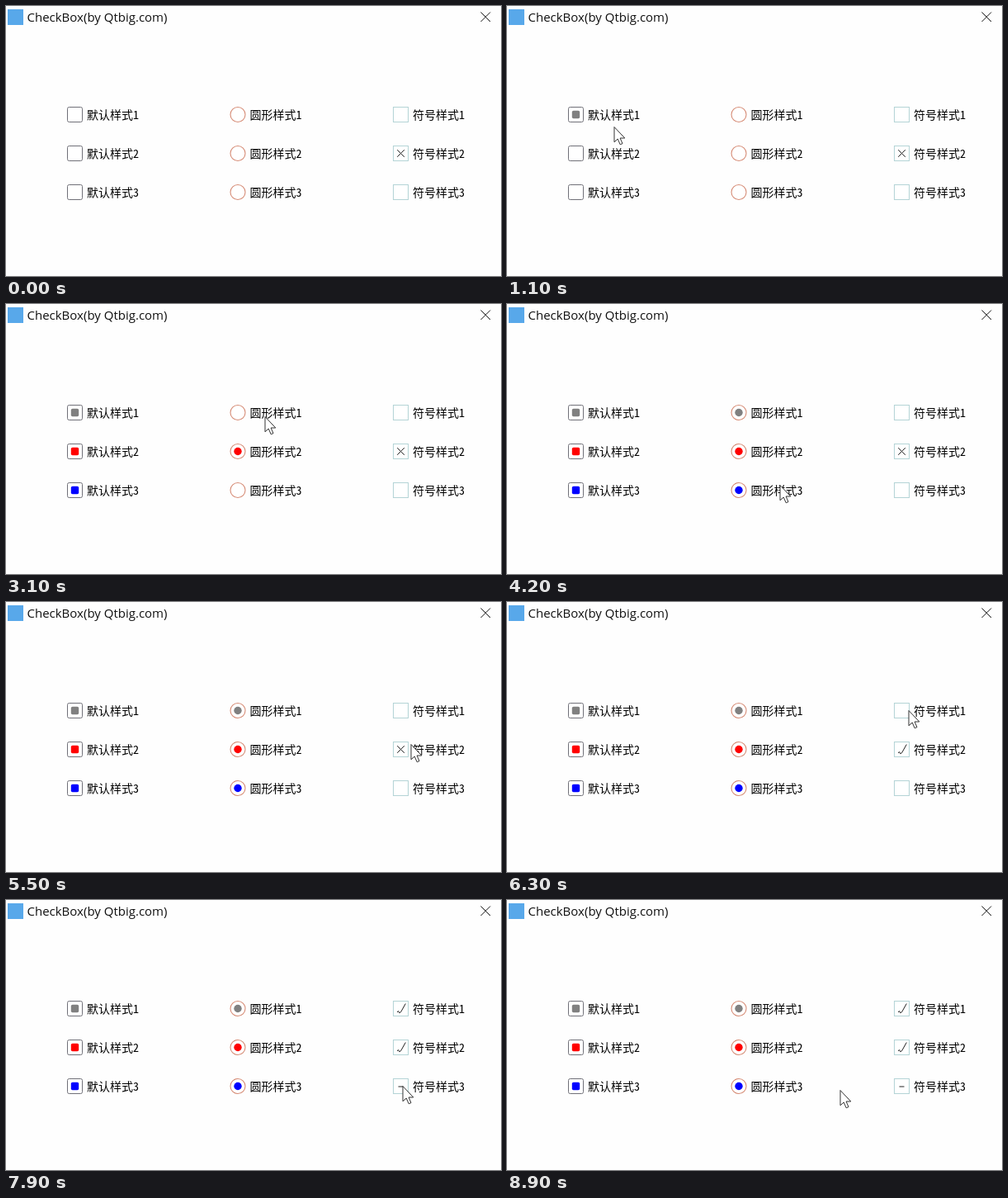
An HTML page that plays this animation: 600 by 327 pixels, repeating every 10 s.

```html
<!DOCTYPE html>
<html lang="zh-CN">
<head>
<meta charset="utf-8">
<title>CheckBox</title>
<style>
html, body { margin: 0; width: 100%; height: 100%; overflow: hidden; background: #fefefe; }
svg { display: block; width: 600px; height: 327px; }
.title { font: 15px "Open Sans", "Noto Sans", sans-serif; fill: #111; }
.label { font: 14px "Noto Sans Mono CJK SC", "Noto Sans CJK SC", "Noto Sans CJK", sans-serif; fill: #000; }
.mark { fill: none; stroke: #222; stroke-linejoin: round; }
</style>
</head>
<body>
<svg viewBox="0 0 600 327">
  <rect width="600" height="327" fill="#fefefe"/>
  <rect x="2" y="4" width="19" height="19" fill="#58a8ea"/>
  <text class="title" x="25.5" y="19">CheckBox(by Qtbig.com)</text>
  <path d="M575.5 7.5 L587 19 M587 7.5 L575.5 19" stroke="#111"/>
  <g id="options"></g>
  <path id="cursor" d="M0 .5 V18.8 L4.2 15 L7.2 21.8 L10 20.6 L7.1 14 H12.8 Z"
        fill="#fff" stroke="#333" stroke-linejoin="round"/>
</svg>
<script>
const LOOP = 10000, STEP = 100;
const NS = "http://www.w3.org/2000/svg";
const options = document.getElementById("options");
const cursor = document.getElementById("cursor");
const columnX = col => 83.5 + 197.5 * col;
const rowY = row => 131.5 + 47 * row;
const colors = ["#808080", "#ff0000", "#0000ff"];
const names = ["默认样式", "圆形样式", "符号样式"];
const tick = "M-4.5 4.3 L-3 3 L-1.8 5.2 L0 4.3 L5.8 -6";
const cross = "M-4.3 -4.3 L4.3 4.3 M4.3 -4.3 L-4.3 4.3";
const dash = "M-3 .5 H3";

function add(tag, x, y, attrs) {
  const el = document.createElementNS(NS, tag);
  el.setAttribute("transform", `translate(${x} ${y})`);
  for (const key in attrs) el.setAttribute(key, attrs[key]);
  return options.appendChild(el);
}

const square = (x, y, size, attrs) =>
  add("rect", x, y, { x: -size / 2, y: -size / 2, width: size, height: size, ...attrs });
const circle = (x, y, r, attrs) => add("circle", x, y, { r, ...attrs });
const symbol = (x, y, d) => add("path", x, y, { d, class: "mark" });

// Each kind of box draws its frame and returns the mark for the checked state.
const kinds = [
  (x, y, row) => {
    square(x, y, 18, { rx: 2, fill: "#fff", stroke: "#707078" });
    return square(x, y, 9.4, { rx: 1.8, fill: colors[row] });
  },
  (x, y, row) => {
    circle(x, y, 9, { fill: "#fff", stroke: "#d68c76", "stroke-width": 1.1 });
    return circle(x, y, 4.7, { fill: colors[row] });
  },
  (x, y, row) => {
    square(x, y, 18, { fill: "#fff", stroke: "#b4d4d6" });
    return symbol(x, y, row === 2 ? dash : tick);
  }
];

const marks = kinds.map((build, col) => colors.map((_, row) => {
  const x = columnX(col), y = rowY(row);
  add("text", x + 14.4, y + 5, { class: "label" }).textContent = names[col] + (row + 1);
  return { el: build(x, y, row), checkedAt: LOOP };
}));
const crossed = symbol(columnX(2), rowY(1), cross);

// The pointer travels between stops; visiting an option checks it on departure.
const stops = [];
const rest = (x, y, arrive, wait = 200) => stops.push({ x, y, arrive, leave: arrive + wait });

function visit(col, row, arrive, dx, dy, wait = 200) {
  rest(columnX(col) + dx, rowY(row) + dy, arrive, wait);
  marks[col][row].checkedAt = arrive + wait;
}

rest(516, 306, 100, 0);
visit(0, 0, 700, 51, -4);
visit(0, 1, 1400, 38, 1);
visit(0, 2, 2000, 34, -3);
visit(1, 1, 2600, 39, -7);
visit(1, 0, 3200, 32, -2);
visit(1, 2, 4000, 50, -7);
rest(339, 175, 4500, 500);
visit(2, 1, 5500, 12, -7);
visit(2, 0, 6400, 8, -3);
visit(2, 2, 7100, 3, -4, 300);
rest(481, 225, 7900, 300);
rest(404, 230, 8700, LOOP);

const smooth = k => k * k * (3 - 2 * k);

function pointerAt(t) {
  const n = stops.findIndex(s => t <= s.leave);
  const to = stops[n], from = stops[n - 1] || to;
  const k = t >= to.arrive ? 1 : smooth((t - from.leave) / (to.arrive - from.leave));
  const mix = (a, b) => Math.round(a + (b - a) * k);
  return [mix(from.x, to.x), mix(from.y, to.y)];
}

function show(el, visible) {
  el.setAttribute("visibility", visible ? "visible" : "hidden");
}

function draw(time) {
  const t = Math.floor((time % LOOP) / STEP) * STEP;
  for (const { el, checkedAt } of marks.flat()) show(el, t >= checkedAt);
  show(crossed, t < marks[2][1].checkedAt);
  show(cursor, t >= stops[0].arrive);
  cursor.setAttribute("transform", `translate(${pointerAt(t)})`);
}

const start = performance.now();
function loop() {
  draw(performance.now() - start);
  requestAnimationFrame(loop);
}
loop();
</script>
</body>
</html>
```
